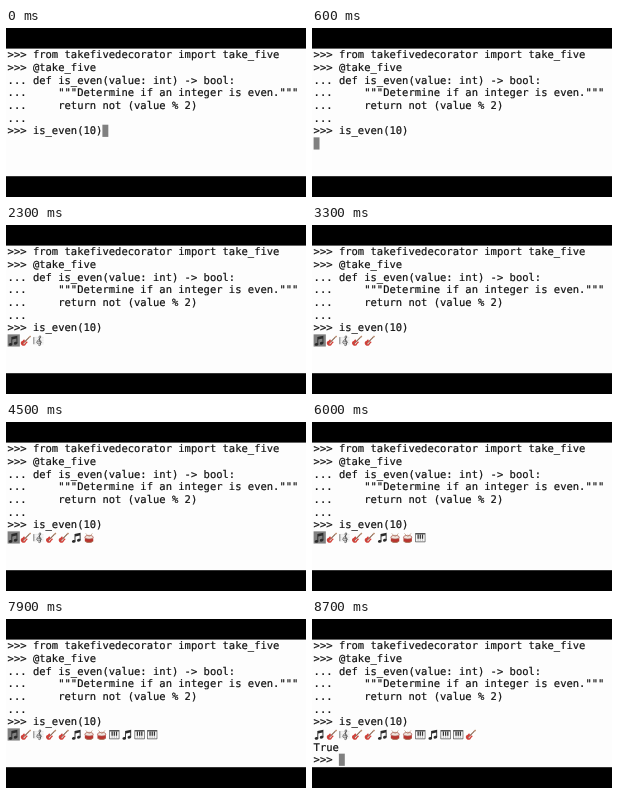
These frames come from a looping animation (300 px wide and 169 px high, 8900 ms). An HTML page:

```html
<!DOCTYPE html>
<html lang="en">
<head>
<meta charset="utf-8">
<style>
  html, body { margin: 0; width: 100%; height: 100%; overflow: hidden; background: #000; }
  svg { display: block; width: 100vw; height: 100vh; }
  text {
    font: 10.5px "DejaVu Sans Mono", monospace; white-space: pre;
    text-rendering: geometricPrecision;
    fill: #111; stroke: #111; stroke-width: .2;
  }
</style>
</head>
<body>
<svg id="stage" viewBox="0 0 300 169">
  <defs>
    <symbol id="note" viewBox="0 0 24 24">
      <path d="M8 4 21 1.5V17h-2V7.5L10 9.3V20H8z" fill="#2c2c2c"/>
      <g fill="#2c2c2c">
        <ellipse cx="6.2" cy="20" rx="4" ry="3" transform="rotate(-15 6.2 20)"/>
        <ellipse cx="17.2" cy="17.4" rx="4" ry="3" transform="rotate(-15 17.2 17.4)"/>
      </g>
    </symbol>
    <symbol id="guitar" viewBox="0 0 24 24">
      <path d="M10 14 19.5 4.5" stroke="#85604a" stroke-width="2.2"/>
      <path d="M18.2 4 21 1l2.4 2.2L20.6 6z" fill="#b98a6c"/>
      <path d="M6.5 10.5C8 9 10 9 9.7 11.5c1 3 2.5 3 4.3 2.5 2.5 0 2 2.5 0 3.5-2.5 1-2 5.5-6 5.5C4 23 1 20 1 16.8c0-4 4.5-3.5 5.5-6.3z" fill="#d2413a"/>
      <path d="m6 18 4.5-4.5 2 1.5L8 20z" fill="#f2d9cf"/>
      <path d="m5 19.5 7-7" stroke="#6b463c" stroke-width="1.2"/>
    </symbol>
    <symbol id="score" viewBox="0 0 24 24">
      <path d="M1 5h22M1 8.500h22M1 12h22M1 15.500h22M1 19h22" stroke="#d0d0d0" fill="none"/>
      <path d="M2 4.500v15" stroke="#777" stroke-width="2"/>
      <path d="M12 22c3 2 5 0 4.300-3L13.500 5c-.5-4 3.500-5 3.200-1 0 5-8.200 6.500-8.200 11.500 0 5 9.500 4.500 9.500 0 0-4-6-4-6 0" stroke="#444" stroke-width="1.700" fill="none"/>
    </symbol>
    <symbol id="drum" viewBox="0 0 24 24">
      <path d="M3 11v8c2 5 16 5 18 0v-8z" fill="#b8352f"/>
      <path d="M3 18.500c3 4 15 4 18 0v1.500c-3 4-15 4-18 0z" fill="#a98568"/>
      <ellipse cx="12" cy="11" rx="9" ry="4" fill="#f0e4de" stroke="#a5574c" stroke-width="1.500"/>
      <path d="m5 3 7 7M19 3l-6 7" stroke="#b58d70" stroke-width="1.500"/>
    </symbol>
    <symbol id="piano" viewBox="0 0 24 24">
      <rect x="1" y="2" width="22" height="20" rx="1" fill="#555"/>
      <path d="M2.500 5.500h19v15h-19z" fill="#f6f6f6"/>
      <path d="M7.300 5.500v15M12 5.500v15M16.700 5.500v15" stroke="#999"/>
      <path d="M7.300 5.500v9M12 5.500v9M16.700 5.500v9" stroke="#333" stroke-width="2.600"/>
    </symbol>
  </defs>
  <rect y="20.6" width="300" height="127.6" fill="#fdfdfd"/>
  <rect id="cursor" height="12.2" fill="#808080"/>
</svg>
<script>
const LOOP = 8900, FRAME = 100, BEAT = 630, FIRST = 640;
const LEFT = 1.6, CELL = 6.32, LINE = 12.65, TOP = 20.8;
const code = `>>> from takefivedecorator import take_five
>>> @take_five
... def is_even(value: int) -> bool:
...     """Determine if an integer is even."""
...     return not (value % 2)
...
>>> is_even(10)`.split("\n");
const tune = "note guitar score guitar guitar note drum drum piano note piano piano guitar".split(" ");

const stage = document.getElementById("stage");
const cursor = document.getElementById("cursor");

function add(tag, attrs, content = "") {
  const el = document.createElementNS("http://www.w3.org/2000/svg", tag);
  for (const name in attrs) el.setAttribute(name, attrs[name]);
  el.textContent = content;
  return stage.appendChild(el);
}

const addLine = (content, row) =>
  add("text", { x: LEFT, y: TOP + 9.6 + row * LINE }, content);

function moveCursor(column, row, cells = 1) {
  cursor.setAttribute("x", LEFT + column * CELL);
  cursor.setAttribute("y", TOP + row * LINE);
  cursor.setAttribute("width", cells * CELL - 0.4);
}

const show = (el, on) => el.setAttribute("visibility", on ? "visible" : "hidden");

code.forEach(addLine);
const icons = tune.map((name, i) => add("use", {
  href: "#" + name, x: LEFT + i * 2 * CELL, y: TOP + 7 * LINE + 0.7, width: 11.2, height: 11.2
}));
const result = [addLine("True", 8), addLine(">>> ", 9)];

function draw(now) {
  const time = Math.floor(now % LOOP / FRAME) * FRAME;
  const played = Math.floor((time - FIRST) / BEAT) + 1;
  const done = played >= tune.length;
  icons.forEach((icon, i) => show(icon, i < played));
  result.forEach(line => show(line, done));
  if (time < FRAME) moveCursor(15, 6);
  else if (done) moveCursor(4, 9);
  else moveCursor(0, 7, played > 0 ? 2 : 1);
}

const start = performance.now();
function tick() {
  draw(performance.now() - start);
  requestAnimationFrame(tick);
}
tick();
</script>
</body>
</html>
```
